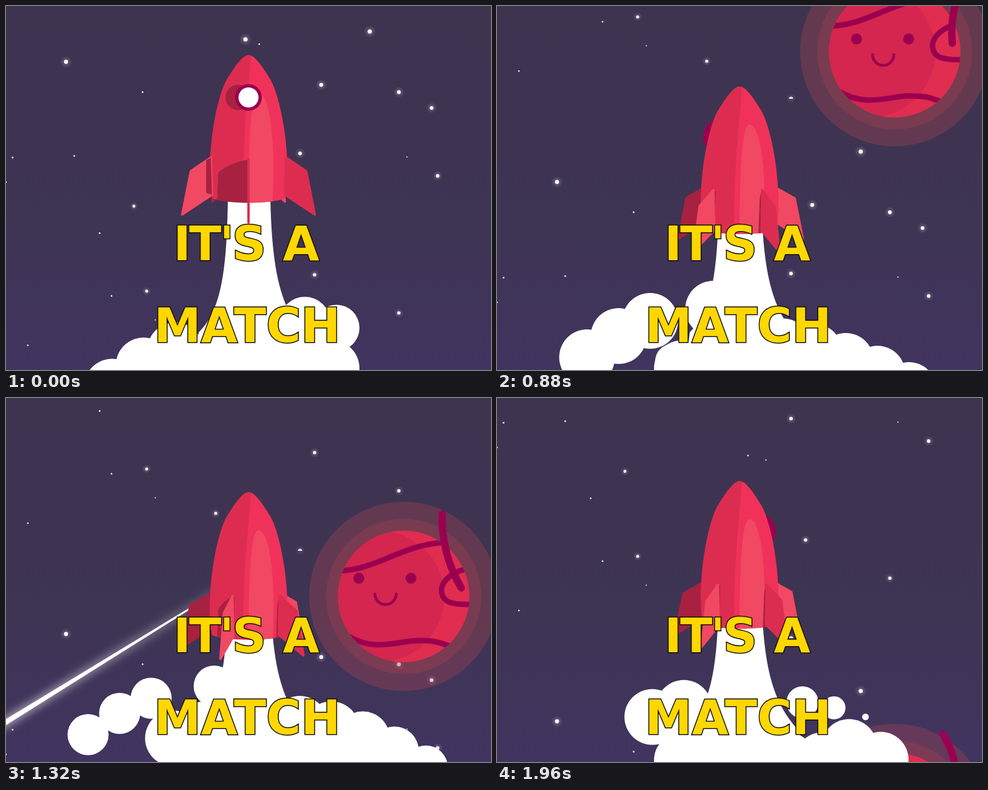
Recreate the animation shown at these times as an HTML page with a canvas. Size 800 by 600 pixels, loop 2000 ms.

```html
<!DOCTYPE html>
<html lang="en">
<head>
<meta charset="utf-8">
<title>It's a match</title>
<style>
  html, body { margin: 0; width: 100%; height: 100%; overflow: hidden; background: #3e3450; }
  canvas { display: block; }
</style>
</head>
<body>
<canvas id="stage" width="800" height="600"></canvas>
<script>
const ctx = document.getElementById('stage').getContext('2d');
const LOOP = 2000, STEP = 40, RAD = Math.PI / 180;
const DARK = '#a82140', RED = '#dc2d50', BRIGHT = '#f0325a', LIGHT = '#f14863', PURPLE = '#9b0050';

const clamp = (v, lo = 0, hi = 1) => Math.min(hi, Math.max(lo, v));
const mix = (a, b, k) => a + (b - a) * k;
// swings between -1 and 1, with its peak at the given time
const wave = (t, peak, period) => Math.cos(2 * Math.PI * (t - peak) / period);

function seeded(seed) {
  return () => (seed = seed * 16807 % 2147483647) / 2147483647;
}

function ellipse(x, y, rx, ry, fill, turn = 0) {
  ctx.fillStyle = fill;
  ctx.beginPath();
  ctx.ellipse(x, y, Math.max(0, rx), Math.max(0, ry), turn, 0, 7);
  ctx.fill();
}
const disc = (x, y, r, fill) => ellipse(x, y, r, r, fill);

function fillPath(d, color) {
  ctx.fillStyle = color;
  ctx.fill(typeof d === 'string' ? new Path2D(d) : d);
}

function strokePath(d, width) {
  ctx.strokeStyle = PURPLE;
  ctx.lineWidth = width;
  ctx.lineCap = ctx.lineJoin = 'round';
  ctx.stroke(new Path2D(d));
}

// A few bright stars stand at fixed places; the faint ones are scattered.
const brightStars = [
  [395, 55], [600, 42], [99, 92], [520, 130], [648, 142], [702, 168], [485, 243],
  [712, 280], [509, 443], [648, 506], [346, 543], [232, 470], [211, 330]
];
const random = seeded(11);
const faintStars = Array.from({ length: 12 }, () => [800 * random(), 650 * random(), 1 + .6 * random()]);

function drawSky(t) {
  const g = ctx.createLinearGradient(0, 0, 0, 600);
  g.addColorStop(0, '#3e3450');
  g.addColorStop(.6, '#3e3453');
  g.addColorStop(1, '#413460');
  ctx.fillStyle = g;
  ctx.fillRect(0, 0, 800, 600);

  const drift = y => (y + .225 * t + 20) % 650 - 20;
  for (const [x, y, r] of faintStars) disc(x, drift(y), r, '#f4f2f6');
  brightStars.forEach(([x, y], i) => {
    const r = 3.6 - .1 * i;
    for (const halo of [2.6, 1.8]) disc(x, drift(y), r * halo, 'rgba(255,255,255,.07)');
    disc(x, drift(y), r, '#fbfafc');
  });

  // one star shows only its upper half
  const y = drift(604);
  disc(485, y, 7, 'rgba(255,255,255,.06)');
  ctx.fillStyle = '#e6e2ea';
  ctx.beginPath();
  ctx.arc(485, y + 1, 3.5, Math.PI, 0);
  ctx.fill();
}

function drawPlanet(t) {
  ctx.save();
  ctx.translate(656, .572 * t - 428);
  disc(0, 0, 156, 'rgba(200,70,80,.27)');
  disc(0, 0, 128, 'rgba(200,65,80,.22)');
  disc(0, 0, 108.5, '#e02d50');

  ctx.save();
  ctx.beginPath();
  ctx.arc(0, 0, 108.5, 0, 7);
  ctx.clip();
  disc(-41, 0, 108, '#d4264f');
  strokePath('M-105-42C-40-46-10-82 64-89', 9);
  strokePath('M-92 65C-50 92-10 74 20 73C45 72 60 75 80 84', 9);
  strokePath('M112-47C75-42 59-20 63-5C66 10 80 14 112 13', 9);
  ctx.restore();

  const turn = clamp((1320 - t) / 440) ** 2;
  const fx = 11 * turn - 31, fy = 9 * turn - 30;
  const open = clamp((Math.abs(t - 1160) - 10) / 90, .28);
  for (const side of [-43, 43]) ellipse(fx + side, fy, 9, 9 * open, PURPLE);
  ctx.strokeStyle = PURPLE;
  ctx.lineWidth = 4.5;
  ctx.lineCap = 'round';
  ctx.beginPath();
  ctx.arc(fx + 1, fy + 26, 17.5, 0, Math.PI);
  ctx.stroke();

  drawAntenna(t);
  ctx.restore();
}

// The antenna swings about its foot and bends behind its own motion.
function drawAntenna(t) {
  const lean = RAD * (22 * wave(t, 880, 1440) - 7);
  const bend = -36 * wave(t, 1080, 1440);
  ctx.save();
  ctx.translate(95, -14);
  ctx.rotate(lean);
  strokePath(`M0 0Q${bend}-63 0-126`, 12);
  ctx.restore();
}

function drawMeteor(t) {
  const head = 266 - 2.5 * (t - 1160);
  if (head > 830 || head < -720) return;
  ctx.save();
  ctx.translate(head, 370 - .617 * (head - 266));
  ctx.rotate(Math.atan(-.617));
  ctx.shadowColor = '#fff';
  ctx.shadowBlur = 16;
  ctx.fillStyle = '#fff';
  ctx.beginPath();
  ctx.arc(0, 0, 5.5, Math.PI / 2, -Math.PI / 2);
  ctx.lineTo(690, 0);
  ctx.fill();
  ctx.restore();
}

// Puffs stand in lanes beside the flame, lower the further out they are;
// each swells, rises while drifting outwards, then shrinks away.
const LEFT = { dir: -1, top: 575, bend: 5, hold: 1500, tire: 0 };
const RIGHT = { dir: 1, top: 590, bend: 3, hold: 1300, tire: 110 };

function drawPuffs(t, side, born, first, last) {
  const age = t - born;
  if (age < 0) return;
  for (let lane = first; lane <= last; lane++) {
    const x = 400 + side.dir * (2 + 52 * lane + .03 * age);
    const y = side.top + side.bend * lane ** 2 - .055 * age;
    const fade = clamp((age - side.hold + side.tire * lane) / 700);
    disc(x, y, 46 * clamp(age / 300) * Math.sqrt(1 - fade), '#fff');
  }
}

function drawSmoke(t) {
  fillPath('M366 318L436 318C439 430 450 500 500 550L500 600L310 600L318 538C357 500 364 430 366 318Z', '#fff');
  for (let x = 305; x < 560; x += 58) disc(x, 597, 46, '#fff');
  drawPuffs(t, LEFT, -500, 0, 0);
  drawPuffs(t, LEFT, -500, 2, 4);
  drawPuffs(t, LEFT, 700, 1, 2);
  drawPuffs(t, RIGHT, -1300, 1, 2);
  drawPuffs(t, RIGHT, 300, 1, 5);
  drawPuffs(t, RIGHT, 1200, 3, 4);
}

const body = new Path2D('M400 0C390 0 377 19 363 42C350 66 336 130 336 190C336 212 337 225 340 236' +
  'C360 246 440 246 460 236C463 225 464 212 464 190C464 130 450 66 437 42C423 19 410 0 400 0Z');

function polygon(points) {
  ctx.beginPath();
  points.forEach(p => ctx.lineTo(...p));
  ctx.closePath();
}

function drawFin(a) {
  const s = Math.sin(a), c = Math.cos(a), front = c > 0;
  const at = (r, y, dip) => [400 + r * s * (.96 + .1 * c), y + dip * c];
  const top = at(66, 168, 4), foot = at(64, 226, 14);
  const lit = front ? s < -.12 : s > 0;
  polygon([top, at(101, 188, 12), at(116, 257, 19), foot]);
  ctx.fillStyle = ctx.strokeStyle = lit ? LIGHT : front ? RED : DARK;
  ctx.lineWidth = 4;
  ctx.lineJoin = 'round';
  ctx.fill();
  ctx.stroke();
  if (front && s < -.8) {
    polygon([top, at(74, 172, 4), at(74, 223, 14), foot]);
    ctx.fillStyle = DARK;
    ctx.fill();
  }
}

function drawFinShadow(a) {
  const deg = a / RAD;
  if (Math.abs(deg) > 60) return;
  const x = 400 + 66 * Math.sin(a);
  const left = Math.min(x, Math.max(348, x - Math.max(5, 52 - 1.6 * deg)));
  fillPath(`M${x + 2} 172Q${mix(left, x, .4)} 177 ${left + 2} 194L${left} 246L${x} 246Z`, DARK);
}

function drawPorthole(a) {
  const s = Math.sin(a), c = Math.cos(a), rim = Math.abs(s);
  const x = 400 + 52 * s, y = 70 + 5.5 * (1 - c), turn = -18 * RAD * s;
  if (c > 0) {
    ctx.save();
    ctx.clip(body);
    ellipse(x - 17 * c, y, 21 * c, 21, DARK, turn);
    ctx.restore();
  }
  ellipse(x, y, 22 * Math.abs(c) + 2.5 * rim, 22 - rim, PURPLE, turn);
  if (c > 0) ellipse(x - 2 * rim, y, 16.5 * c - 3.5 * rim, 16.5 - 3 * rim, '#fff', turn);
}

function drawRocket(t) {
  const spin = -.126 * t * RAD;
  const fins = [0, 1, 2, 3, 4].map(i => {
    const a = spin + i * 72 * RAD;
    return Math.atan2(Math.sin(a), Math.cos(a));
  }).sort((a, b) => Math.cos(a) - Math.cos(b));
  const isFront = a => Math.cos(a) > 0;

  ctx.save();
  ctx.translate(0, 118.5 + 38 * wave(t, 1450, 3000));
  fins.filter(a => !isFront(a)).forEach(drawFin);
  if (!isFront(spin)) drawPorthole(spin);

  ctx.save();
  ctx.clip(body);
  fillPath(body, RED);
  fillPath('M404 0C401 60 391 110 391 250L470 250L470 0Z', BRIGHT);
  fillPath('M416 63C404 63 400 140 400 250L439 250C445 180 440 63 416 63Z', LIGHT);
  fins.filter(isFront).forEach(drawFinShadow);
  ctx.restore();

  if (isFront(spin)) drawPorthole(spin);
  fins.filter(isFront).forEach(drawFin);
  ctx.restore();
}

function drawText(text, x, y, tracking, gap) {
  ctx.font = 'bold 78px "DejaVu Sans", sans-serif';
  ctx.letterSpacing = tracking;
  ctx.wordSpacing = gap;
  ctx.lineJoin = 'miter';
  ctx.miterLimit = 3;
  ctx.lineWidth = 3;
  ctx.strokeStyle = '#111';
  ctx.strokeText(text, x, y);
  ctx.fillStyle = '#ffd700';
  ctx.fillText(text, x, y);
}

function draw(t) {
  drawSky(t);
  drawPlanet(t);
  drawMeteor(t);
  drawSmoke(t);
  drawRocket(t);
  drawText("IT'S A", 276, 419, '-3px', '6px');
  drawText('MATCH', 244, 554, '0px', '0px');
}

const start = performance.now();
function tick() {
  const t = (performance.now() - start) % LOOP;
  draw(Math.floor(t / STEP) * STEP);
  requestAnimationFrame(tick);
}
tick();
</script>
</body>
</html>
```
